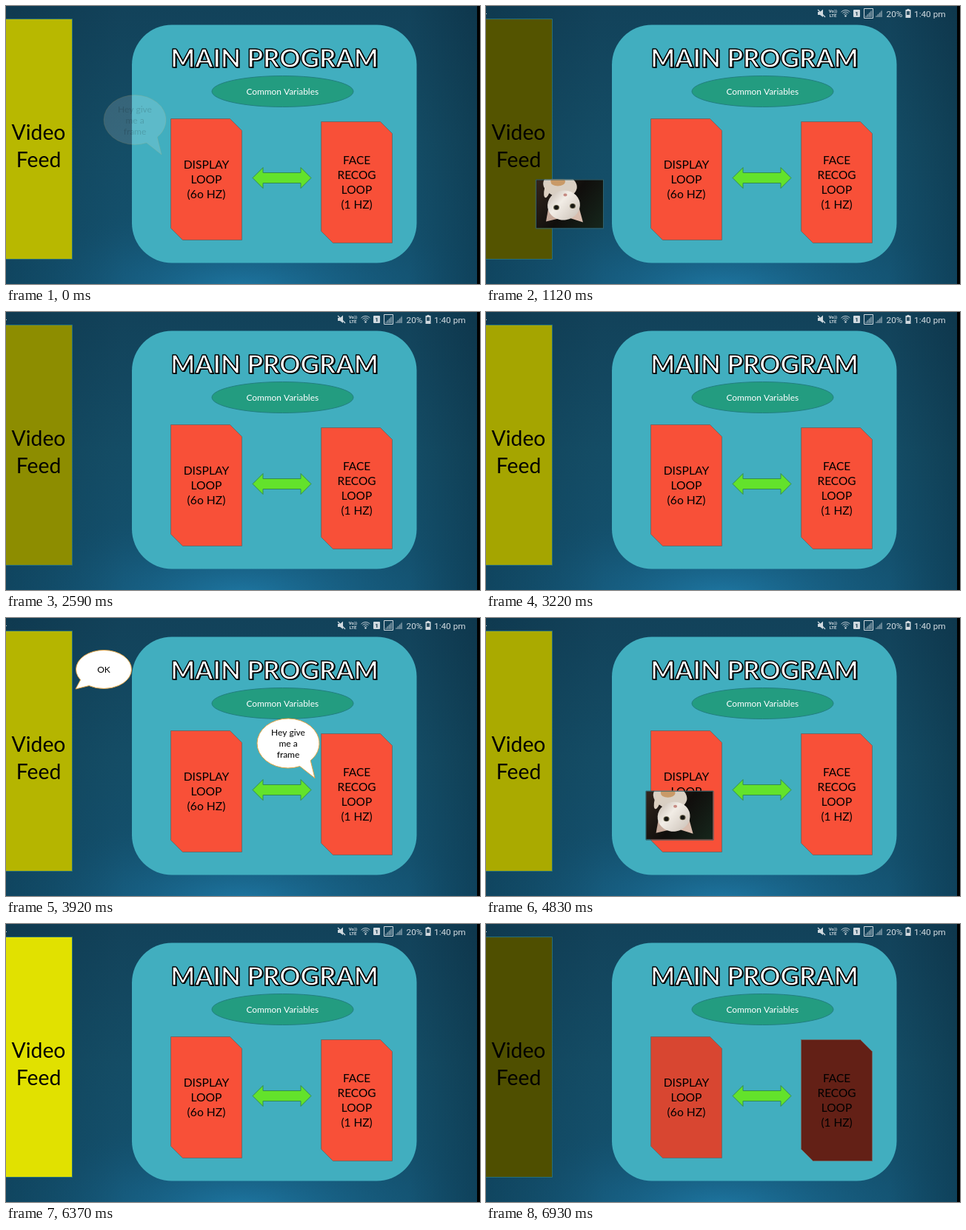
These frames come from a looping animation (640 px wide and 376 px high, 7 s). An HTML page with a canvas:

```html
<!DOCTYPE html>
<html lang="en">
<head>
<meta charset="utf-8">
<title>Main program loops</title>
<style>
html, body { margin: 0; width: 100%; height: 100%; overflow: hidden; background: #000; }
canvas { display: block; }
</style>
</head>
<body>
<canvas id="stage" width="640" height="376"></canvas>
<script>
const ctx = document.getElementById('stage').getContext('2d');
const LOOP = 7000, STEP = 70, TAU = Math.PI * 2;

const clamp = x => Math.min(1, Math.max(0, x));
const ramp = (t, a, b) => clamp((t - a) / (b - a));
const smooth = x => x * x * (3 - 2 * x);
const mix = (a, b, k) => a + (b - a) * k;
// Triangle wave: 1 at phase 0, 0 at phase 1
const pulse = p => Math.abs(1 - p % 2);
const shade = (rgb, k) => `rgb(${rgb.map(c => Math.round(c * k)).join(',')})`;

function paint(fill, stroke, width = 1) {
  if (fill) { ctx.fillStyle = fill; ctx.fill(); }
  if (stroke) { ctx.strokeStyle = stroke; ctx.lineWidth = width; ctx.stroke(); }
}

function poly(points, fill, stroke) {
  ctx.beginPath();
  points.forEach(([x, y]) => ctx.lineTo(x, y));
  ctx.closePath();
  paint(fill, stroke);
}

function oval(x, y, rx, ry, fill, stroke, tilt = 0) {
  ctx.beginPath();
  ctx.ellipse(x, y, rx, ry, tilt, 0, TAU);
  paint(fill, stroke);
}

function lines(rows, x, y, size, gap, color = '#000') {
  ctx.font = `${size}px Lato, sans-serif`;
  ctx.textAlign = 'center';
  ctx.textBaseline = 'alphabetic';
  ctx.fillStyle = color;
  rows.forEach((row, i) => ctx.fillText(row, x, y + i * gap));
}

function background() {
  const base = ctx.createLinearGradient(0, 0, 0, 376);
  base.addColorStop(0, '#12425a');
  base.addColorStop(0.5, '#144d66');
  base.addColorStop(1, '#13516f');
  ctx.fillStyle = base;
  ctx.fillRect(0, 0, 640, 376);

  ctx.save();
  ctx.translate(320, 385);
  ctx.scale(1, 0.38);
  const glow = ctx.createRadialGradient(0, 0, 0, 0, 0, 330);
  glow.addColorStop(0, 'rgba(34,132,180,.75)');
  glow.addColorStop(0.5, 'rgba(28,112,155,.32)');
  glow.addColorStop(1, 'rgba(20,80,110,0)');
  ctx.fillStyle = glow;
  ctx.fillRect(-320, -1000, 640, 1020);
  ctx.restore();

  const sides = ctx.createLinearGradient(0, 0, 640, 0);
  sides.addColorStop(0, 'rgba(4,24,38,.2)');
  sides.addColorStop(0.25, 'rgba(4,24,38,0)');
  sides.addColorStop(0.85, 'rgba(4,24,38,0)');
  sides.addColorStop(1, 'rgba(4,24,38,.28)');
  ctx.fillStyle = sides;
  ctx.fillRect(0, 0, 640, 376);
}

function videoFeed(level) {
  ctx.beginPath();
  ctx.rect(-1, 17.5, 90.5, 325);
  paint(shade([255, 255, 0], level), '#27707a');
  lines(['Video', 'Feed'], 44, 181, 28.3, 37);
}

function loopBox(x, y, level) {
  const w = 96, h = 164, cut = 16;
  poly([[x, y], [x + w - cut, y], [x + w, y + cut], [x + w, y + h],
    [x + cut, y + h], [x, y + h - cut]], shade([248, 80, 56], level), '#6b6a68');
}

function title(text, x, y) {
  ctx.font = '700 35px Lato, sans-serif';
  ctx.textAlign = 'center';
  ctx.textBaseline = 'alphabetic';
  ctx.lineJoin = 'round';
  ctx.strokeStyle = ctx.fillStyle = '#000';
  ctx.lineWidth = 1.4;
  ctx.fillText(text, x + 1.5, y + 1.5);
  ctx.fillStyle = '#fff';
  ctx.fillText(text, x, y);
  ctx.strokeText(text, x, y);
}

function mainPanel(display, face) {
  ctx.beginPath();
  ctx.roundRect(170, 25.5, 384.5, 322, 54);
  paint('#41aebf');
  title('MAIN PROGRAM', 362.5, 82.5);

  oval(373.5, 115.5, 95.5, 21, '#239c80', '#227f80');
  lines(['Common Variables'], 373.3, 119.7, 11.9, 0, '#fff');

  loopBox(222.5, 152.5, display);
  lines(['DISPLAY', 'LOOP', '(6o HZ)'], 270.5, 220, 15.7, 20);
  loopBox(425.5, 156.5, face);
  lines(['FACE', 'RECOG', 'LOOP', '(1 HZ)'], 473.5, 214, 15.4, 20);

  poly([[333, 232.5], [347, 218.5], [347, 225.5], [398, 225.5], [398, 218.5],
    [412, 232.5], [398, 246.5], [398, 239.5], [347, 239.5], [347, 246.5]], '#63e22b', '#338b50');
}

function bubble(x, y, rx, ry, tip, from, to, rows, alpha) {
  if (alpha <= 0) return;
  const rad = Math.PI / 180;
  ctx.save();
  ctx.globalAlpha = alpha;
  ctx.beginPath();
  ctx.ellipse(x, y, rx, ry, 0, to * rad, from * rad + TAU);
  ctx.lineTo(...tip);
  ctx.closePath();
  paint('#fff', '#e5a545');
  lines(rows, x, y + 4.5 - (rows.length - 1) * 7.5, 12, 15);
  ctx.restore();
}

const ask = (x, y, alpha) =>
  bubble(x, y, 42, 33.5, [x + 36, y + 47], 44, 68, ['Hey give', 'me a', 'frame'], alpha);
const agree = alpha => bubble(132, 69.5, 37.5, 26, [94, 96], 122, 147, ['OK'], alpha);

function photo(x, y, alpha) {
  if (alpha <= 0) return;
  ctx.save();
  ctx.globalAlpha = alpha;
  ctx.translate(x, y);
  ctx.beginPath();
  ctx.rect(0, 0, 91, 66);
  ctx.save();
  ctx.clip();
  const back = ctx.createLinearGradient(0, 0, 91, 66);
  back.addColorStop(0, '#33261e');
  back.addColorStop(0.5, '#100e0c');
  back.addColorStop(1, '#16271c');
  ctx.fillStyle = back;
  ctx.fillRect(0, 0, 91, 66);

  const fur = ctx.createLinearGradient(14, 10, 62, 52);
  fur.addColorStop(0, '#b9aca0');
  fur.addColorStop(0.45, '#f2ede6');
  fur.addColorStop(1, '#c9bfb5');
  oval(33, 8, 23, 16, '#d9cfc3', null, 0.2);
  oval(30, 3, 10, 6, '#c99a68');
  oval(16, 13, 4, 12, '#dccfc0', null, 0.25);
  poly([[17, 40], [14, 57], [31, 53]], '#c7aa9b');
  poly([[45, 52], [64, 58], [58, 36]], '#d9bdae');
  oval(38, 35, 22, 20, fur, null, -0.15);
  oval(40, 21, 2.5, 2, '#c58a82');
  for (const [ex, ey] of [[28, 38], [50, 36]]) {
    oval(ex, ey, 4, 3.5, '#6b654d');
    oval(ex, ey, 2.8, 2.8, '#171713');
  }
  ctx.restore();
  ctx.strokeStyle = '#31616a';
  ctx.lineWidth = 1;
  ctx.strokeRect(0.5, 0.5, 91, 66);
  ctx.restore();
}

function signal(x) {
  poly([[x, 15], [x + 9, 15], [x + 9, 5]], 'rgba(205,215,222,.3)');
  for (let i = 0; i < 4; i++) ctx.fillRect(x + i * 2.5, 13 - i * 2, 1.5, 2 + i * 2);
}

function statusBar() {
  const ink = '#d0d9df';
  ctx.fillStyle = ctx.strokeStyle = ink;
  ctx.fillRect(0, 10, 1, 1);

  poly([[448, 8], [451, 8], [455, 4.5], [455, 15], [451, 12], [448, 12]], ink);
  ctx.lineWidth = 1.3;
  ctx.beginPath();
  ctx.moveTo(448, 5);
  ctx.lineTo(458, 15);
  ctx.stroke();

  ctx.textAlign = 'center';
  ctx.font = '700 6px Roboto, sans-serif';
  ctx.fillText('Vo))', 468.5, 9);
  ctx.fillText('LTE', 468.5, 15);

  ctx.lineWidth = 0.9;
  for (const r of [3, 5.5, 8]) {
    ctx.beginPath();
    ctx.arc(485.5, 13.5, r, -Math.PI * 0.77, -Math.PI * 0.23);
    ctx.stroke();
  }
  oval(485.5, 13.5, 1.2, 1.2, ink);

  ctx.beginPath();
  ctx.roundRect(496, 5, 9, 10, 1);
  paint(ink);
  ctx.font = '700 8px Roboto, sans-serif';
  ctx.fillStyle = '#12384c';
  ctx.fillText('1', 500.5, 13);

  ctx.fillStyle = ctx.strokeStyle = ink;
  ctx.lineWidth = 1;
  ctx.strokeRect(510.5, 3.5, 12, 13);
  signal(512);
  signal(526);

  ctx.textAlign = 'left';
  ctx.font = '11.8px Roboto, sans-serif';
  ctx.fillStyle = ink;
  ctx.fillText('20%', 540.5, 15);
  ctx.fillText('1:40 pm', 578, 15);
  ctx.fillRect(568.5, 4, 3, 2);
  ctx.fillRect(566.5, 5, 7, 11);
  ctx.fillStyle = '#305467';
  ctx.fillRect(568, 7, 4, 5);
}

function deliver(t, start, endX) {
  const k = smooth(ramp(t, start + 100, start + 850));
  const alpha = ramp(t, start - 60, start + 30) * (1 - ramp(t, start + 1060, start + 1300));
  photo(mix(67, endX, k), mix(234.5, 232.5, k), alpha);
}

function draw(t) {
  const step = Math.floor(t / STEP);
  t = step * STEP;

  const faceAsking = t > 3500 && t < 4350;
  const feed = pulse(0.28 + 0.8993 * step - (faceAsking ? 0.35 : 0));
  const busy = Math.max(0, step - 93);

  background();
  videoFeed(feed);
  mainPanel(pulse(busy * 0.355), pulse(busy * 0.1));

  const fade = (a, b, c, d) => ramp(t, a, b) * (1 - ramp(t, c, d));
  ask(174, 154, fade(-75, 425, 850, 1050));
  agree(fade(400, 650, 850, 1050));
  ask(381, 169.5, fade(3250, 3700, 4150, 4350));
  agree(fade(3600, 3900, 4150, 4350));

  deliver(t, 1050, 230);
  deliver(t, 4400, 429);

  if (step > 0) statusBar();
  ctx.fillStyle = '#000';
  ctx.fillRect(636, 0, 4, 376);
}

const origin = performance.now();
function frame() {
  draw((performance.now() - origin) % LOOP);
  requestAnimationFrame(frame);
}
frame();
</script>
</body>
</html>
```
